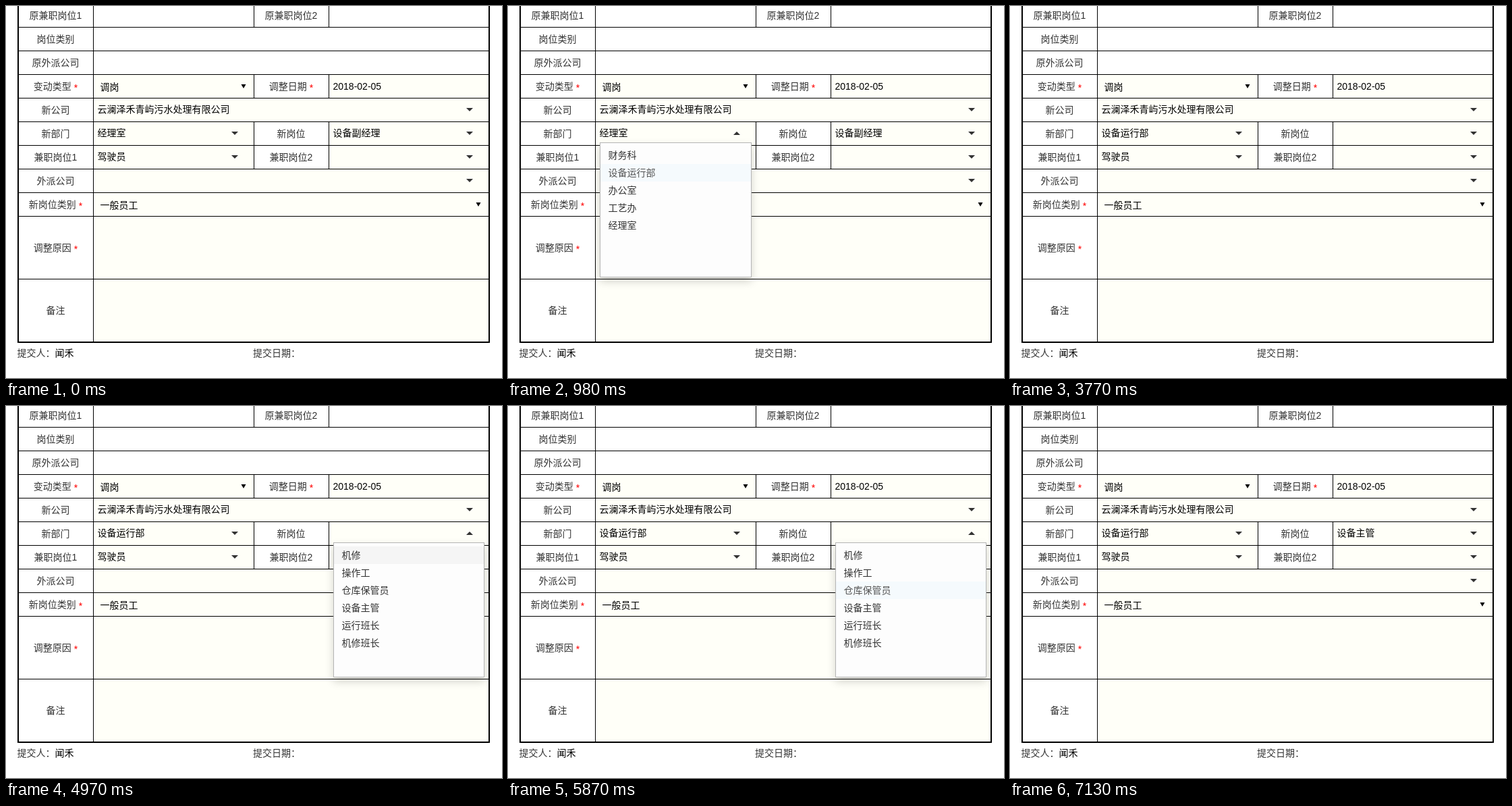
Recreate the animation shown at these times as an HTML page with a canvas. Size 735 by 551 pixels, loop 8 s.

```html
<!DOCTYPE html>
<html lang="zh-CN">
<head>
<meta charset="utf-8">
<title>岗位调整</title>
<style>
html, body { margin: 0; width: 100%; height: 100%; overflow: hidden; background: #fff; }
canvas { display: block; }
</style>
</head>
<body>
<canvas id="stage" width="735" height="551"></canvas>
<script>
const ctx = document.getElementById('stage').getContext('2d');
const LOOP = 8000;
const FONT = '14px "Liberation Sans", Arial, "Noto Sans CJK SC", "Noto Sans CJK", sans-serif';
const FIELD = '#fffff8', LABEL = '#333', INK = '#000';
const LEFT = 17, RIGHT = 717, COL1 = 129, COL2 = 367, COL3 = 478, BOTTOM = 497;

// [top, height, label, required, second label, second required]
const rows = [
  [-4, 35, '原兼职岗位1', false, '原兼职岗位2'],
  [31, 35, '岗位类别'],
  [66, 35, '原外派公司'],
  [101, 35, '变动类型', true, '调整日期', true],
  [136, 35, '新公司'],
  [171, 35, '新部门', false, '新岗位'],
  [206, 35, '兼职岗位1', false, '兼职岗位2'],
  [241, 35, '外派公司'],
  [276, 35, '新岗位类别', true],
  [311, 93, '调整原因', true],
  [404, 93, '备注']
];

const departments = {
  x: 136, width: 225, selected: 4, caretX: 178, open: 500, close: 3770,
  items: ['财务科', '设备运行部', '办公室', '工艺办', '经理室'],
  hover: [[500, -1], [770, 0], [870, 1], [1490, 2], [1640, 1]],
  caret: [[500, true], [980, false], [1490, true]]
};
const positions = {
  x: 485, width: 224, selected: 0, caretX: 485, open: 4970, close: 7130,
  items: ['机修', '操作工', '仓库保管员', '设备主管', '运行班长', '机修班长'],
  hover: [[4970, -1], [5450, 0], [5630, 1], [5870, 2], [6140, 3]],
  caret: [[4970, false], [5000, true], [5480, false], [5960, true], [6470, false], [6980, true]]
};

const isOpen = (menu, t) => t >= menu.open && t < menu.close;

function valueAt(steps, t) {
  let value = steps[0][1];
  for (const [time, next] of steps) if (t >= time) value = next;
  return value;
}

function rect(x, y, w, h, color) {
  ctx.fillStyle = color;
  ctx.fillRect(x, y, w, h);
}

// y is the visual middle of the line
function text(str, x, y, color = INK) {
  ctx.fillStyle = color;
  ctx.fillText(str, x, y + 5);
}

function triangle(x, y, halfWidth, height, color) {
  ctx.fillStyle = color;
  ctx.beginPath();
  ctx.moveTo(x - halfWidth, y - height / 2);
  ctx.lineTo(x + halfWidth, y - height / 2);
  ctx.lineTo(x, y + height / 2);
  ctx.fill();
}

const selectArrow = (x, y) => triangle(x, y, 3.5, 6, INK);
const comboArrow = (x, y, up) => triangle(x, y, 5, up ? -5 : 5, LABEL);

function label(str, required, center, y) {
  const width = ctx.measureText(required ? str + ' *' : str).width;
  const x = center - width / 2;
  text(str, x, y, LABEL);
  if (required) text('*', x + ctx.measureText(str + ' ').width, y + 2, '#f00');
}

function drawTable() {
  rect(COL1, 102, RIGHT - COL1, BOTTOM - 102, FIELD);
  for (const [top, height, first, required, second, required2] of rows) {
    const middle = top + Math.floor(height / 2) + 1;
    label(first, required, 73.5, middle);
    if (second) {
      const y = Math.max(top, 0);
      rect(COL2, y, COL3 - COL2, top + height - y, top > 100 || top < 0 ? '#fff' : FIELD);
      rect(COL2, y, 1, top + height - y, INK);
      rect(COL3, y, 1, top + height - y, INK);
      label(second, required2, 422.5, middle);
    }
  }
  for (const [top, height] of rows) rect(LEFT, top + height, RIGHT - LEFT, 1, INK);
  rect(COL1, 0, 1, BOTTOM, INK);
  rect(LEFT, 0, 2, BOTTOM + 2, INK);
  rect(RIGHT - 2, 0, 2, BOTTOM + 2, INK);
  rect(LEFT, BOTTOM, RIGHT - LEFT, 2, INK);
}

function drawValues(t) {
  text('调岗', 139.5, 120);
  selectArrow(352, 119);
  text('2018-02-05', 484.5, 119);
  text('云澜泽禾青屿污水处理有限公司', 135.5, 153);
  comboArrow(687, 153.5);

  text(t < departments.close ? '经理室' : '设备运行部', 135.5, 188);
  comboArrow(339, 188.5, isOpen(departments, t));
  const position = t < departments.close ? '设备副经理' : t < positions.close ? '' : '设备主管';
  text(position, 484.5, 188);
  comboArrow(687, 188.5, isOpen(positions, t));

  text('驾驶员', 135.5, 223);
  comboArrow(339, 223.5);
  comboArrow(687, 223.5);
  comboArrow(687, 258.5);
  text('一般员工', 139.5, 295);
  selectArrow(700, 294);

  text('提交人：', 16.5, 514, LABEL);
  text('闻禾', 72.5, 514);
  text('提交日期：', 366, 514, LABEL);
}

function drawMenu(menu, t) {
  if (!isOpen(menu, t)) return;
  const { x, width } = menu, top = 202, height = 200;
  ctx.save();
  ctx.shadowColor = 'rgba(0,0,0,.175)';
  ctx.shadowBlur = 12;
  ctx.shadowOffsetY = 6;
  rect(x, top, width, height, '#b5b5b5');
  ctx.restore();
  rect(x + 1, top + 1, width - 2, height - 2, '#fdfdfd');

  const hovered = valueAt(menu.hover, t);
  const active = hovered < 0 ? menu.selected : hovered;
  menu.items.forEach((item, i) => {
    const y = 208 + i * 26;
    if (i === active) rect(x + 1, y, width - 2, 26, hovered < 0 ? '#f5f5f5' : '#f5fafd');
    text(item, x + 12.5, y + 13, i === hovered ? '#555' : LABEL);
  });
  if (valueAt(menu.caret, t)) rect(menu.caretX, 180, 1, 16, INK);
}

function frame(now) {
  const t = now % LOOP;
  rect(0, 0, 735, 551, '#fff');
  ctx.font = FONT;
  drawTable();
  drawValues(t);
  drawMenu(departments, t);
  drawMenu(positions, t);
  requestAnimationFrame(frame);
}

const start = performance.now();
requestAnimationFrame(function begin() {
  frame(0);
});
</script>
</body>
</html>
```
